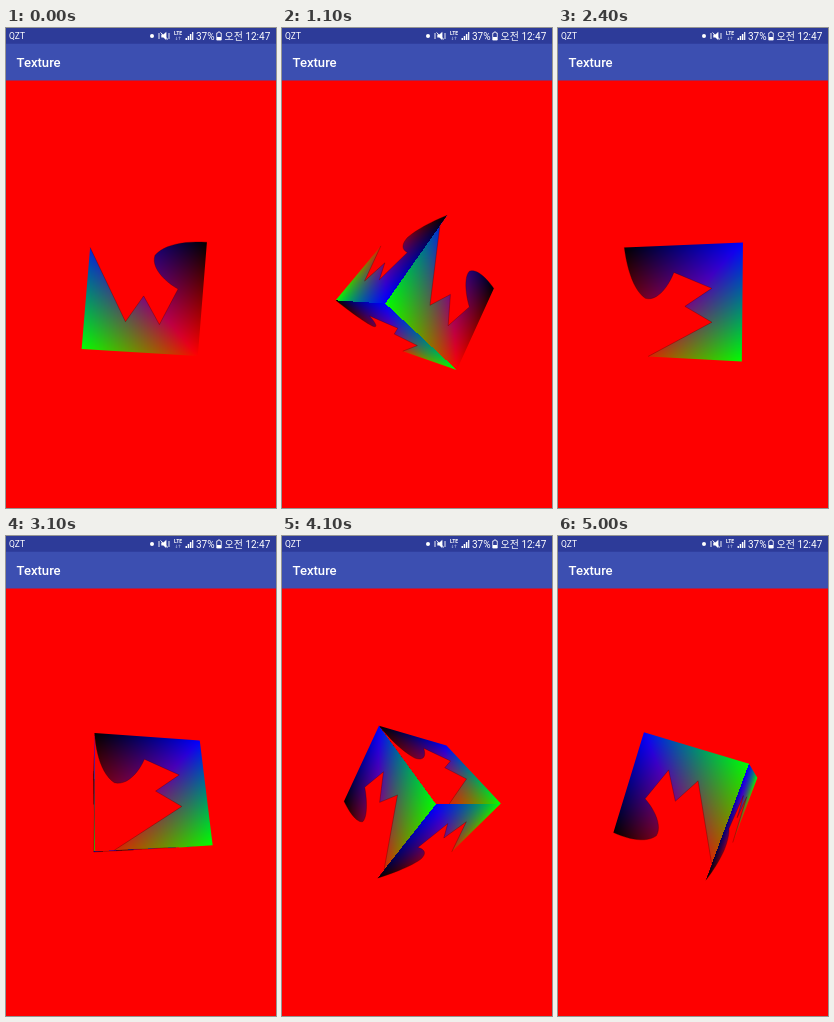
Write an HTML page with a canvas that moves like this. It is 270 px wide and 480 px high and loops after 5100 ms.

```html
<!DOCTYPE html>
<html lang="ko">
<head>
<meta charset="utf-8">
<title>Texture</title>
<style>
html, body { margin: 0; width: 100%; height: 100%; overflow: hidden; background: #fe0000; }
canvas, svg { position: absolute; left: 0; top: 0; width: 270px; height: 480px; display: block; }
text { fill: #fff; font-family: Roboto, "Noto Sans CJK KR", "Noto Sans CJK", sans-serif; }
</style>
</head>
<body>
<canvas id="stage" width="270" height="480"></canvas>
<svg viewBox="0 0 270 480">
  <rect width="270" height="52.5" fill="#3c4fb1"/>
  <rect width="270" height="15.75" fill="#2d3b99"/>
  <text x="3" y="11" font-size="8.5">QZT</text>
  <text x="10.5" y="39" font-size="13.1" font-weight="500">Texture</text>
  <circle cx="146" cy="8" r="2" fill="#fff"/>
  <g fill="none" stroke="#fff" stroke-width="0.9">
    <path d="M153 5v6M163 5v6M154.500 4.500l7.500 7"/>
    <path d="M155.500 6.700h1.700l3-2.400v7.400l-3-2.400h-1.700z" fill="#fff" stroke-width="0.4"/>
  </g>
  <text x="168" y="7.400" font-size="5" font-weight="700">LTE</text>
  <path d="M170.500 8.800v3M169.600 10.800l.9 1 .9-1M173.500 11.800v-3M172.600 9.800l.9-1 .9 1" fill="none" stroke="#aab3dc" stroke-width="0.6"/>
  <path d="M179.500 12v-2h1.500v2zM181.700 12v-4h1.500v4zM183.900 12v-6h1.500v6zM186.100 12v-8h1.200v8z" fill="#fff"/>
  <text x="190" y="11.700" font-size="10">37%</text>
  <path d="M210.700 5h1.300v-1h2v1h1.300v7h-4.600z" fill="none" stroke="#fff" stroke-width="0.8"/>
  <rect x="211" y="9" width="4" height="3" fill="#fff"/>
  <text x="264.300" y="11.700" font-size="10" text-anchor="end">오전 12:47</text>
</svg>
<script>
const LOOP = 5100, STEP = 100;
const CX = 135, CY = 266.25, FOCAL = 213.75, EYE = 4.66;

// [ms, degrees]
const TURN = [[0, 4.7], [500, 21.3], [1600, 55.1], [2400, 79.9], [3100, 103.1], [4100, 134], [5100, 162.6]];

// Corners: black k, cut-edge end s, last corner o; swap exchanges red and blue.
const FACES = [
  { n: [0, 0, 1],  k: [1, 1, 1],    s: [-1, 1, 1],  o: [1, -1, 1], swap: true },
  { n: [-1, 0, 0], k: [-1, 1, 1],   s: [-1, 1, -1], o: [-1, -1, 1] },
  { n: [0, -1, 0], k: [-1, -1, -1], s: [1, -1, -1], o: [-1, -1, 1] },
  { n: [0, 0, -1], k: [-1, 1, -1],  s: [1, 1, -1],  o: [-1, -1, -1] },
  { n: [1, 0, 0],  k: [1, 1, -1],   s: [1, 1, 1],   o: [1, -1, -1] }
];

function bezier(a, b, c, d) {
  const out = [];
  for (let i = 0; i < 12; i++) {
    const t = i / 12, q = 1 - t;
    out.push([0, 1].map(j =>
      q * q * q * a[j] + 3 * q * q * t * b[j] + 3 * q * t * t * c[j] + t * t * t * d[j]));
  }
  return out;
}

const TIP = [0.448, 0.16], NECK = [0.223, 0.432];
const CUT = [
  ...bezier([0, 0], [0.2, 0.01], [0.38, 0.06], TIP),
  ...bezier(TIP, [0.475, 0.26], [0.36, 0.37], NECK),
  NECK, [0.361, 0.751], [0.517, 0.516], [0.654, 0.747], [1, 0.147]
];
const SHAPE = [...CUT, [1, 1], [0, 1]];

const ctx = document.getElementById('stage').getContext('2d');
const paint = document.createElement('canvas');
paint.width = 270;
paint.height = 480;
const pctx = paint.getContext('2d');

const dot = (a, b) => a[0] * b[0] + a[1] * b[1] + a[2] * b[2];
const sub = (a, b) => a.map((x, i) => x - b[i]);

function angleAt(t) {
  let i = 1;
  while (i < TURN.length - 1 && t > TURN[i][0]) i++;
  const [t0, a0] = TURN[i - 1], [t1, a1] = TURN[i];
  return (a0 + (a1 - a0) * (t - t0) / (t1 - t0)) * Math.PI / 180;
}

// Turn by -a about z, then by a about y; y points down on screen.
function rotate([x, y, z], a) {
  const s = Math.sin(a), c = Math.cos(a);
  return [x * c * c + y * s * c + z * s, x * s - y * c, z * c - x * c * s - y * s * s];
}

function project(p) {
  const f = FOCAL / (EYE - p[2]);
  return [CX + p[0] * f, CY + p[1] * f];
}

function pose(face, a) {
  const k = rotate(face.k, a);
  return {
    n: rotate(face.n, a), k, swap: face.swap,
    eu: sub(rotate(face.s, a), k),
    ev: sub(rotate(face.o, a), k)
  };
}

const place = (f, [u, v]) => project(f.k.map((x, i) => x + u * f.eu[i] + v * f.ev[i]));

// The colours blend over two triangles that meet on the red-blue diagonal.
function shade(u, v, swap) {
  const low = u + v < 1;
  const a = low ? u : 1 - v, b = low ? v : 1 - u;
  return [swap ? b : a, u + v - 1, swap ? a : b];
}

function paintFaces(faces) {
  const pts = faces.flatMap(f => [[0, 0], [1, 0], [1, 1], [0, 1]].map(q => place(f, q)));
  const xs = pts.map(p => p[0]), ys = pts.map(p => p[1]);
  const x0 = Math.floor(Math.min(...xs)) - 2, y0 = Math.floor(Math.min(...ys)) - 2;
  const w = Math.ceil(Math.max(...xs)) + 2 - x0, h = Math.ceil(Math.max(...ys)) + 2 - y0;
  const img = pctx.createImageData(w, h);
  for (let y = 0; y < h; y++) {
    for (let x = 0; x < w; x++) {
      const ray = [(x0 + x + 0.5 - CX) / FOCAL, (y0 + y + 0.5 - CY) / FOCAL, -1];
      let best = Infinity, rgb = [0, 0, 0];
      for (const f of faces) {
        const s = (1 - f.n[2] * EYE) / dot(f.n, ray);
        const p = [s * ray[0] - f.k[0], s * ray[1] - f.k[1], EYE - s - f.k[2]];
        const u = dot(p, f.eu) / 4, v = dot(p, f.ev) / 4;
        const out = Math.max(Math.abs(u - 0.5), Math.abs(v - 0.5));
        if (out < best) {
          best = out;
          rgb = shade(u, v, f.swap);
        }
      }
      const i = (y * w + x) * 4;
      rgb.forEach((c, j) => { img.data[i + j] = c * 255; });
      img.data[i + 3] = 255;
    }
  }
  pctx.clearRect(0, 0, 270, 480);
  pctx.putImageData(img, x0, y0);
}

function trace(f, list) {
  list.forEach((q, i) => {
    const [x, y] = place(f, q);
    i ? ctx.lineTo(x, y) : ctx.moveTo(x, y);
  });
}

function draw(t) {
  const a = angleAt(t);
  const faces = FACES.map(f => pose(f, a)).filter(f => f.n[2] * EYE > 1);
  paintFaces(faces);

  ctx.fillStyle = '#fe0000';
  ctx.fillRect(0, 0, 270, 480);
  ctx.beginPath();
  for (const f of faces) {
    trace(f, SHAPE);
    ctx.closePath();
  }
  ctx.fillStyle = ctx.createPattern(paint, 'no-repeat');
  ctx.fill();

  ctx.beginPath();
  for (const f of faces) trace(f, CUT);
  ctx.strokeStyle = 'rgba(40,0,0,0.35)';
  ctx.lineWidth = 0.8;
  ctx.stroke();
}

let start = null, shown = -1;
function tick() {
  const now = performance.now();
  if (start === null) start = now;
  const t = Math.floor(((now - start) % LOOP) / STEP) * STEP;
  if (t !== shown) draw(shown = t);
  requestAnimationFrame(tick);
}
tick();
</script>
</body>
</html>
```
